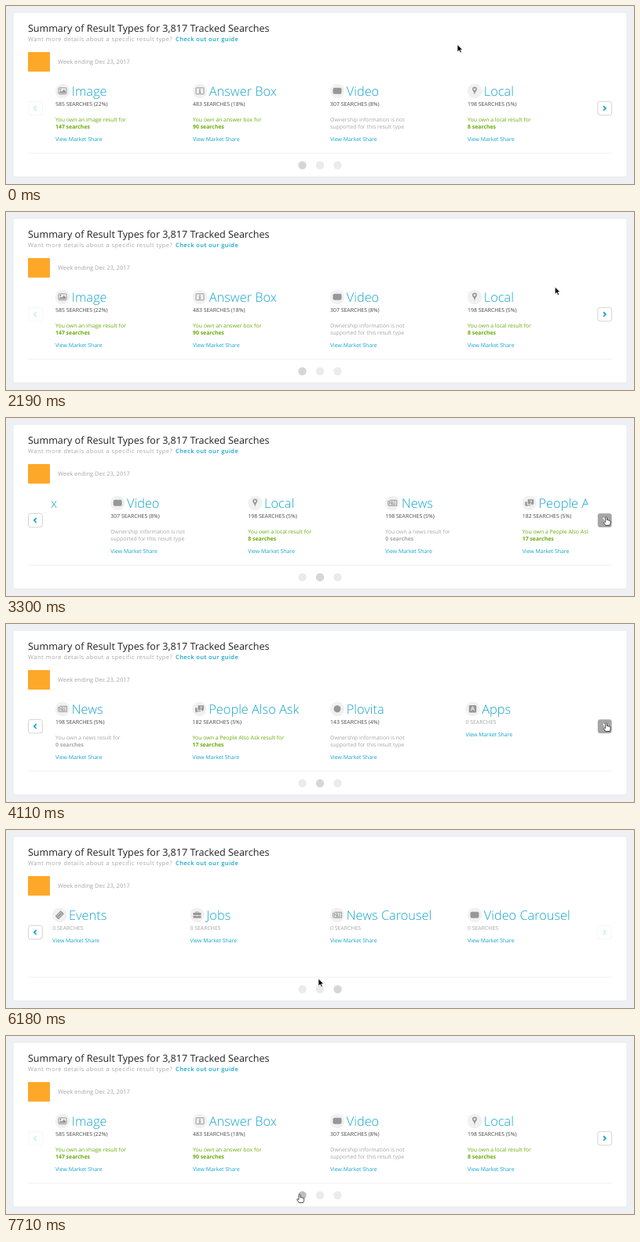
Animation, 800 px wide and 228 px high, one loop 7.74 s. Source, as an HTML page:

```html
<!DOCTYPE html>
<html lang="en">
<head>
<meta charset="utf-8">
<title>Result types carousel</title>
<style>
html, body { margin: 0; width: 100%; height: 100%; overflow: hidden; background: #eff0f4; }
svg { display: block; font: 6.92px "Open Sans", sans-serif; text-rendering: geometricPrecision; }
.head { font-size: 12.57px; fill: #222; }
.sub { font-size: 7.5px; letter-spacing: .465px; fill: #a9a9a9; }
.sub tspan { font-weight: 600; letter-spacing: .4px; fill: #12a5cb; }
.week { font-size: 7.5px; fill: #a6a6a6; }
.name { font-size: 16.35px; font-weight: 300; fill: #14a3ca; }
.link { fill: #14a3ca; }
.dark { fill: #484848; }
.green { fill: #69ab0c; }
.gray { fill: #a6a6a6; }
.bold { font-weight: 700; }
.line { fill: none; stroke: #979797; }
</style>
</head>
<body>
<svg width="800" height="228" viewBox="0 0 800 228">
  <defs><clipPath id="view"><rect x="57" y="95" width="684" height="85"/></clipPath></defs>
  <rect x="9" y="9" width="782" height="210.5" rx="2.5" fill="#e6e7eb"/>
  <rect x="9.5" y="9" width="781" height="209.5" rx="2" fill="#fff"/>
  <text class="head" x="27.9" y="33">Summary of Result Types for 3,817 Tracked Searches</text>
  <text class="sub" x="28" y="45">Want more details about a specific result type?<tspan x="216">Check out our guide</tspan></text>
  <rect x="28" y="59" width="28" height="25" rx="1" fill="#fea829"/>
  <text class="week" x="66" y="74.4">Week ending Dec 23, 2017</text>
  <g clip-path="url(#view)"><g id="track"></g></g>
  <path d="M28 188.5H772" stroke="#f3f3f3"/>
  <g id="dots"></g>
  <g id="prev"><rect x="28.5" y="122.3" width="17.8" height="17.6" rx="3"/><path d="M38.7 128.2l-2.9 2.9 2.9 2.9"/></g>
  <g id="next"><rect x="753.8" y="122.3" width="17.8" height="17.6" rx="3"/><path d="M761 128.2l2.9 2.9-2.9 2.9"/></g>
  <path id="arrow" d="M0 0V9.2L2.2 7.2 3.7 10.6 5.3 9.9 3.8 6.6H6.6Z" fill="#000" stroke="#fff" stroke-width=".7"/>
  <path id="hand" d="M-1 1Q0-.6 1 1V4.3Q2.1 3.6 2.8 4.7 3.8 4 4.4 5.1 5.6 4.7 5.6 6.2V8.2L4.6 11H-.8L-3.4 7.2Q-3.4 5.6-1 7Z" fill="#fff" stroke="#222" stroke-width=".8"/>
</svg>
<script>
const $ = id => document.getElementById(id);
const LOOP = 7740, PITCH = 700, NEXT = 3178, JUMP = 4710, BACK = 6480, SLIDE = 500;

// Icons are centred on 0,0
const newspaper = '<path class="line" d="M-3.5-3.5H5.5V3.5H-4.5Q-5.5 3.5-5.5 2.5V-2.2H-3.5V2.5M-1.8-1.7H.6V.6H-1.8ZM2-1.7H4M2 .3H4M-1.8 2H4"/>';
const block = '<rect x="-5.5" y="-4" width="11" height="8" rx="2"/>';
const icons = {
  image: '<rect class="line" x="-5" y="-4" width="10" height="8" rx="1"/><circle cx="-2.6" cy="-1.8" r="1"/><path d="M-4 2.8V1.4L-2.2-.2-1 1 1.8-2 4 .4V2.8Z"/>',
  info: '<rect class="line" x="-5" y="-4" width="10" height="8" rx=".5"/><path d="M-.7-2.7H.7V-1.4H-.7ZM-1.2-.7H.7V1.8H1.3V2.6H-1.3V1.8H-.7V0H-1.2Z"/>',
  block,
  pin: '<path fill-rule="evenodd" d="M0 5.2C-1-.2-3-.2-3-2.2A3 3 0 0 1 3-2.2C3-.2 1-.2 0 5.2ZM0-3.6A1.4 1.4 0 0 0 0-.8 1.4 1.4 0 0 0 0-3.6Z"/>',
  newspaper,
  chat: '<path d="M-2-4.5H5.5V1.5H4.5V3.3L2.6 1.5H-2Z"/><path d="M-5.5-1.5H-3V2.5H1.5V3.4H-2.6L-4.4 5V3.4H-5.5Z"/><text x=".4" y=".8" font-size="6" font-weight="700" fill="#fff">?</text>',
  ball: '<circle r="4.5"/>',
  letter: '<rect x="-4.7" y="-4.7" width="9.4" height="9.4" rx="1.5"/><text y="2.6" font-size="7.5" font-weight="600" text-anchor="middle" fill="#fff">A</text>',
  ticket: '<g transform="rotate(-45)"><rect x="-5" y="-3" width="10" height="6" rx=".8"/><path d="M-2.8-1.5H2.8V1.5H-2.8Z" fill="none" stroke="#eee" stroke-width=".7"/></g>',
  bag: '<path d="M-5-2.7H-2V-4.3H2V-2.7H5V.3H-5ZM-1.1-2.7H1.1V-3.5H-1.1ZM-5 1H-1V1.8H1V1H5V4H-5Z" fill-rule="evenodd"/>'
};

const unowned = ['gray', 'Ownership information is not', 'supported for this result type'];
const owned = (what, n) => [n ? 'green' : 'gray', `You own a${what} result for`, n + ' searches', 'bold'];
const items = [
  [63, 'image', 'Image', '585 SEARCHES (22%)', owned('n image', 147)],
  [238, 'info', 'Answer Box', '483 SEARCHES (18%)', ['green', 'You own an answer box for', '90 searches', 'bold']],
  [413, 'block', 'Video', '307 SEARCHES (8%)', unowned],
  [588, 'pin', 'Local', '198 SEARCHES (5%)', owned(' local', 8)],
  [763, 'newspaper', 'News', '198 SEARCHES (5%)', owned(' news', 0)],
  [937.5, 'chat', 'People Also Ask', '182 SEARCHES (5%)', owned(' People Also Ask', 17)],
  [1113, 'ball', 'Plovita', '143 SEARCHES (4%)', unowned],
  [1285.5, 'letter', 'Apps'],
  [1459.3, 'ticket', 'Events'],
  [1634.5, 'bag', 'Jobs'],
  [1813, 'newspaper', 'News Carousel'],
  [1988, 'block', 'Video Carousel']
];

const text = (cls, y, s, x = 0) => `<text class="${cls}" x="${x}" y="${y}">${s}</text>`;
$('track').innerHTML = items.map(([x, icon, name, count, note]) =>
  `<g transform="translate(${x})"><circle cx="9" cy="108.8" r="9.3" fill="#f1f1f1"/>
  <g transform="translate(9 108.8)" fill="#979797">${icons[icon]}</g>` +
  text('name', 114.7, name, 20.8) +
  text(count ? 'dark' : 'gray', 127.8, count || '0 SEARCHES') +
  (note ? text(note[0], 147.7, note[1]) + text(`${note[0]} ${note[3] || ''}`, 157.2, note[2]) : '') +
  text('link', note ? 173 : 143.5, 'View Market Share') + '</g>').join('');
$('dots').innerHTML = [377.5, 400, 422.5].map(x => `<circle cx="${x}" cy="204" r="5.2"/>`).join('');

// cubic-bezier(.25, .1, .25, 1)
function ease(p) {
  if (p >= 1) return 1;
  let lo = 0, hi = 1;
  for (let i = 0; i < 24; i++) {
    const s = (lo + hi) / 2;
    if (.75 * s * (1 - s) + s ** 3 < p) lo = s; else hi = s;
  }
  return .3 * lo * (1 - lo) ** 2 + 3 * lo * lo * (1 - lo) + lo ** 3;
}

// Pointer legs: start, end, x, y; y lags a little, bending the path
const legs = [[1590, 2590, 764.5, 126.5], [5490, 6180, 398, 190.5], [6180, 6400, 374, 202.5]];
function pointer(t) {
  let x = 575, y = 49.5;
  for (const [from, to, toX, toY] of legs) {
    const u = Math.min(1, Math.max(0, (t - from) / (to - from)));
    const p = (1 - Math.cos(Math.PI * u)) / 2;
    x += (toX - x) * p;
    y += (toY - y) * p ** 1.2;
  }
  return [x, y];
}

function button(id, on, hover) {
  const [box, mark] = $(id).children;
  box.setAttribute('fill', hover ? '#a5a5a5' : '#fff');
  box.setAttribute('stroke', hover ? 'none' : on ? '#d4d4d4' : '#f6f6f6');
  mark.setAttribute('fill', 'none');
  mark.setAttribute('stroke', hover ? '#fff' : on ? '#14a3ca' : '#c4e8f2');
  mark.setAttribute('stroke-width', on ? 1.7 : 1.3);
}

function draw(now) {
  const t = now % LOOP;
  const page = t < NEXT ? 0 : t < JUMP ? 1 : t < BACK ? 2 : 0;
  const shift = t < NEXT ? 0 : t < JUMP ? ease((t - NEXT) / SLIDE)
    : t < BACK ? 2 : 2 - 2 * ease((t - BACK) / SLIDE);
  const [x, y] = pointer(t);
  const onNext = x > 754 && page < 2, onDot = y > 199;

  $('track').setAttribute('transform', `translate(${-PITCH * shift})`);
  button('prev', page > 0, false);
  button('next', page < 2, onNext);
  [...$('dots').children].forEach((dot, i) =>
    dot.setAttribute('fill', onDot && i === 0 ? '#bdbdbd' : i === page ? '#d6d6d6' : '#ebebeb'));
  for (const id of ['arrow', 'hand']) {
    $(id).setAttribute('transform', `translate(${x} ${y})`);
    $(id).style.display = (id === 'hand') === (onNext || onDot) ? '' : 'none';
  }
}

const start = performance.now();
function tick() {
  draw(performance.now() - start);
  requestAnimationFrame(tick);
}
tick();
</script>
</body>
</html>
```
